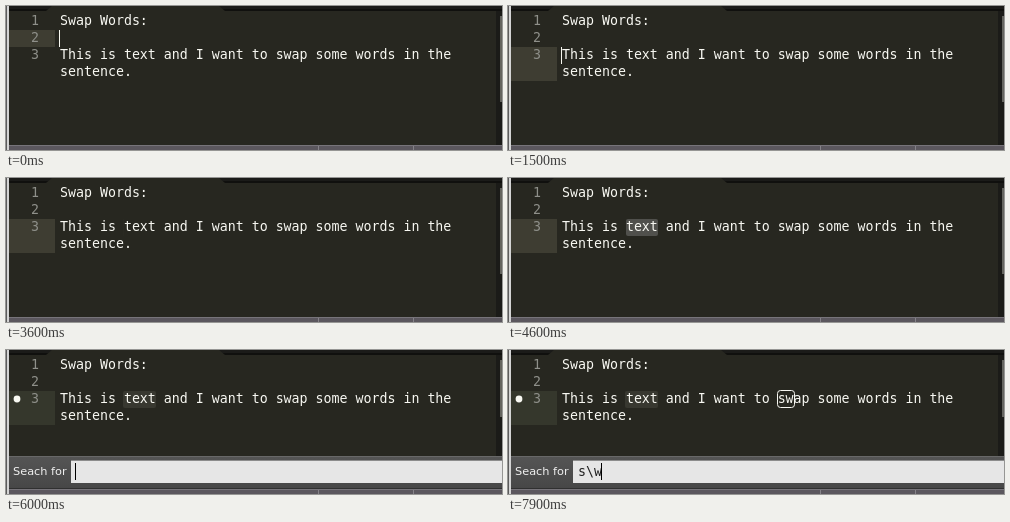
These frames come from a looping animation (496x144 px, 8 s). An HTML page with a canvas:

```html
<!DOCTYPE html>
<html lang="en">
<head>
<meta charset="utf-8">
<title>Swap words</title>
<style>
html, body { margin: 0; width: 100%; height: 100%; overflow: hidden; background: #272720; }
canvas { display: block; }
</style>
</head>
<body>
<canvas id="stage" width="496" height="144"></canvas>
<script>
const ctx = document.getElementById('stage').getContext('2d');
const LOOP = 8000, LEFT = 54, CHAR = 8, ROW = 17;
const MONO = '13.288px "DejaVu Sans Mono", monospace';
const SANS = '11.33px "DejaVu Sans", sans-serif';
const LINES = ['Swap Words:', '', 'This is text and I want to swap some words in the', 'sentence.'];

// Editor caret: [time, row, column]
const moves = [[0, 1, 0], [1200, 2, 0]];
for (let i = 1; i < 8; i++) moves.push([1780 + i * 120, 2, i]);
moves.push([2900, 2, 8]);
for (let i = 0; i < 4; i++) moves.push([3700 + i * 120, 2, 9 + i]);

// Search field: [time, text, matched characters]
const queries = [[4700, 'text', 0], [6000, '', 0], [6700, 's', 1], [7300, 's\\', 0], [7700, 's\\w', 2]];
const PANEL = queries[0][0], DOT = 5500;

const current = (list, t) => list.filter(e => e[0] <= t).pop();
const colX = col => LEFT + col * CHAR;
const rowY = row => 7 + row * ROW;

function rect(x, y, w, h, color) {
  ctx.fillStyle = color;
  ctx.fillRect(x, y, w, h);
}

function text(str, x, y, color, font = MONO) {
  ctx.font = font;
  ctx.fillStyle = color;
  ctx.fillText(str, x, y);
}

function rounded(x, y, w, h, r) {
  ctx.beginPath();
  ctx.roundRect(x, y, w, h, r);
}

// Caret opacity: on, fade out, off, fade in
function blink(age) {
  const p = age % 800;
  return p <= 300 ? 1 : p < 500 ? (500 - p) / 200 : p <= 700 ? 0 : (p - 700) / 100;
}

function caret(x, y, h, color, age) {
  ctx.globalAlpha = blink(age);
  rect(x, y, 1, h, color);
  ctx.globalAlpha = 1;
}

function drawWindow(searching) {
  rect(0, 0, 496, 144, '#272720');
  rect(0, 0, 496, 3, '#1b1b19');
  rect(0, 3, 496, 2, '#10100e');
  ctx.fillStyle = '#272720';
  ctx.beginPath();
  ctx.moveTo(40, 5);
  ctx.lineTo(46, 0);
  ctx.lineTo(213, 0);
  ctx.lineTo(219, 5);
  ctx.fill();
  rect(490, 5, 6, 134, '#1b1b18');
  rect(494, 10, 2, searching ? 57 : 86, '#64645f');
  rect(0, 139, 496, 5, '#5b575e');
  rect(0, 139, 496, 1, '#77747a');
  for (const x of [312, 407]) rect(x, 140, 1, 4, '#858288');
  rect(0, 0, 1, 144, '#5c5c5c');
  rect(1, 0, 2, 144, '#d4d4d4');
}

function drawEditor(t, searching) {
  const [time, row, col] = current(moves, t);
  rect(3, rowY(row), 46, row === 2 ? ROW * 2 : ROW, searching ? '#35372c' : '#3e3d32');
  if (col > 8) {
    const pad = searching ? 1 : 0;
    ctx.fillStyle = searching ? '#383830' : '#50504c';
    rounded(colX(8) - pad, rowY(2), (col - 8) * CHAR + pad, ROW, 2);
    ctx.fill();
  }
  LINES.forEach((line, i) => {
    text(line, LEFT, 19 + i * ROW, '#f8f8f2');
    if (i < 3) text(i + 1, 25, 19 + i * ROW, '#8f908a');
  });
  if (!searching) caret(colX(col) - 1, rowY(row), ROW, '#f8f8f0', t - time);
}

function drawSearch(t) {
  const [time, query, matched] = current(queries, t);
  const shade = ctx.createLinearGradient(0, 106, 0, 138);
  shade.addColorStop(0, '#555555');
  shade.addColorStop(1, '#474747');
  rect(3, 106, 493, 32, shade);
  rect(3, 106, 493, 1, '#686868');
  rect(3, 138, 493, 1, '#303030');
  rect(65, 110, 431, 23, '#e6e6e6');
  rect(65, 110, 431, 1, '#8c8c8c');
  text('Seach for', 7, 125, '#f0f0f0', SANS);
  text(query, 70, 126, '#202020');
  caret(69 + query.length * CHAR, 113, 17, '#000', t - time);

  if (t >= DOT && query !== 's\\') {
    ctx.fillStyle = '#f8f8f2';
    ctx.beginPath();
    ctx.arc(11, 49, 3.4, 0, Math.PI * 2);
    ctx.fill();
  }
  if (matched) {
    ctx.strokeStyle = '#f8f8f2';
    ctx.lineWidth = 1;
    rounded(colX(27) - .5, rowY(2) - .5, matched * CHAR + 1, ROW, 3);
    ctx.stroke();
  }
}

function frame(now) {
  const t = now % LOOP, searching = t >= PANEL;
  drawWindow(searching);
  drawEditor(t, searching);
  if (searching) drawSearch(t);
  requestAnimationFrame(frame);
}
requestAnimationFrame(frame);
</script>
</body>
</html>
```
